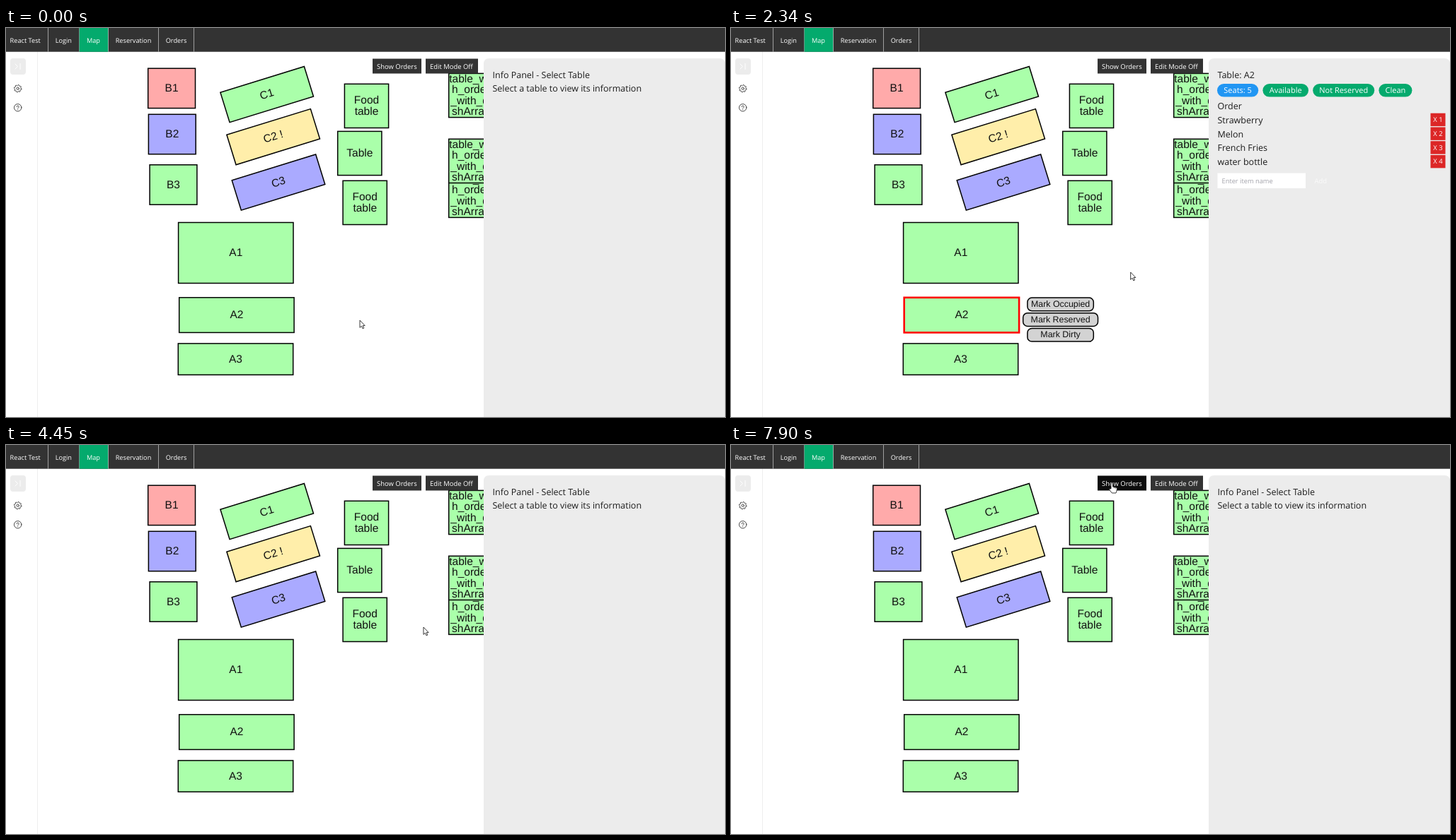
An HTML page that plays this animation: 1016 px wide and 551 px high, repeating every 8000 ms.

```html
<!DOCTYPE html>
<html lang="en">
<head>
<meta charset="utf-8">
<title>Table map</title>
<style>
html, body { margin: 0; width: 100%; height: 100%; overflow: hidden; background: #fff; }
svg { display: block; width: 1016px; height: 551px; font-family: "Open Sans", sans-serif; text-rendering: geometricPrecision; }
.map { font-family: "Liberation Sans", Arial, sans-serif; fill: #111; }
.nav { font-size: 9.2px; fill: #fff; }
.btn { font-size: 9.45px; fill: #fff; }
.pill { font-size: 11px; fill: #fff; }
.info { font-size: 12.5px; fill: #1c1c1c; }
.hint { font-size: 9.3px; fill: #a3a3ab; }
.mid { text-anchor: middle; }
.icon { fill: none; stroke: #444; stroke-linecap: round; stroke-linejoin: round; }
#cursor path { fill: #fff; stroke: #222; stroke-width: .9; stroke-linejoin: round; }
</style>
</head>
<body>
<svg viewBox="0 0 1016 551">
  <path d="M44.5 33V551" stroke="#eee"/>
  <rect x="6" y="43" width="22" height="23" rx="4" fill="#ececec"/>
  <path class="icon" style="stroke:#fff" d="M13 51l3.5 3.5-3.5 3.5M20 50.5v8"/>
  <g class="icon">
    <path id="gear"/>
    <circle cx="16.7" cy="85.7" r="1.7"/>
    <circle cx="16.7" cy="112.8" r="5.2"/>
    <path d="M15.2 111.6a1.5 1.5 0 1 1 2.2 1.3q-.7.4-.7 1M16.7 115.6v.1"/>
  </g>
  <g id="scene"></g>
  <g id="nav"></g>
  <g id="cursor">
    <path id="arrow" d="M0 0V10.4L2.4 8.2 4.1 11.9 5.8 11.1 4.2 7.6H7.2Z"/>
    <path id="hand" d="M-1.3 8V.8A1.25 1.25 0 0 1 1.2 .8V5l4.6 1q1.6.5 1.4 2.2l-.7 3.4-.8 2.4H0l-3.6-4.6q-.5-1.4 1-1.4zM3.2 5.6v1.6M5.2 6v1.5"/>
  </g>
</svg>
<script>
const LOOP = 8000;
const GREEN = '#afa', RED = '#faa', BLUE = '#aaf', YELLOW = '#fea', TEAL = '#04aa6d';
const LABEL = 15.5, SMALL = 12.4, MIDDLE = .295, ROW = 19.75;
const $ = id => document.getElementById(id);

const text = (x, y, s, cls, extra = '') => `<text x="${x}" y="${y}" class="${cls}" ${extra}>${s}</text>`;
const box = (x, y, w, h, fill, extra = '') =>
  `<rect x="${x}" y="${y}" width="${w}" height="${h}" fill="${fill}" ${extra}/>`;

// Tables of one shape share a group; x and y are centres, | breaks a line
const DISH = 'table_wit|h_order|_with_di|shArray';
const groups = [
  { w: 66.8, h: 56.4, tables: [
    { x: 234.1, y: 85.4, label: 'B1', fill: RED },
    { x: 234.8, y: 150.5, label: 'B2', fill: BLUE },
    { x: 236.5, y: 222, label: 'B3' }] },
  { w: 124, h: 44.4, angle: -17.2, tables: [
    { x: 368.7, y: 94.1, label: 'C1', order: 'Apple, Banana, Ice|cream, New item' },
    { x: 377.7, y: 154.2, label: 'C2 !', fill: YELLOW },
    { x: 385, y: 218.6, label: 'C3', order: 'apple', fill: BLUE }] },
  { w: 62.2, h: 62.2, tables: [
    { x: 509.5, y: 110.4, label: 'Food|table' },
    { x: 499.8, y: 177.5, label: 'Table' },
    { x: 507.2, y: 247.4, label: 'Food|table' },
    { x: 656.8, y: 95.5, label: DISH, order: '65542110|08e3f692|3059bcd4' },
    { x: 656.8, y: 237.3, label: DISH, order: '6552ee10|d55243a1|6461b002' },
    { x: 656.8, y: 188.4, label: DISH, order: '6552ee12|011859e0|99792d31' }] },
  { w: 162.4, h: 86, tables: [{ x: 324.8, y: 318.5, label: 'A1' }] },
  { w: 162.4, h: 49.6, tables: [
    { x: 325.9, y: 406.6, label: 'A2', order: 'Strawberry, Melon, French|Fries, water bottle' }] },
  { w: 162.4, h: 44.4, tables: [{ x: 324.5, y: 469.1, label: 'A3' }] },
];
const tables = groups.flatMap(({ tables, ...shape }) =>
  tables.map(t => ({ angle: 0, fill: GREEN, order: '(no order)', ...shape, ...t })));
const guests = {
  A1: { seats: 3, x: 464.6, y: 275.7, items: [] },
  A2: { seats: 5, x: 465.6, y: 382.1, items: ['Strawberry', 'Melon', 'French Fries', 'water bottle'] },
};

function table({ x, y, w, h, fill, label, order, angle }, selected, orders) {
  const frame = selected ? 'stroke="#f00" stroke-width="2.6"' : 'stroke="#000" stroke-width="1.5"';
  const lines = (orders ? order : label).split('|'), size = orders ? SMALL : LABEL;
  const left = orders ? 3.1 - w / 2 : 0, top = orders ? 3.1 - h / 2 : -lines.length * size / 2;
  return `<g transform="translate(${x} ${y}) rotate(${angle})">` + box(-w / 2, -h / 2, w, h, fill, frame) +
    lines.map((s, i) => text(left, top + size * (i + .5 + MIDDLE), s,
      orders ? 'map' : 'map mid', `font-size="${size}"`)).join('') + '</g>';
}

function actions({ x, y }) {
  return ['Mark Occupied', 'Mark Reserved', 'Mark Dirty'].map((s, i) => {
    const w = i === 1 ? 105.8 : 93.4, top = y + 21.7 * i;
    return box(x - w / 2, top, w, 18.6, '#d3d3d3', 'rx="6.2" stroke="#000" stroke-width="1.5"') +
      text(x, top + 12.7, s, 'map mid', `font-size="${SMALL}"`);
  }).join('');
}

function toolbar(orders, hover) {
  const w = orders ? 65.5 : 69, x = 518 + w + 6;
  return box(518, 43.5, w, 21, hover ? '#0d0d0d' : '#333') + box(x, 43.5, 74, 21, '#333') +
    text(524, 57.7, orders ? 'Hide Orders' : 'Show Orders', 'btn') + text(x + 6, 57.7, 'Edit Mode Off', 'btn');
}

function panel(name) {
  const back = '<path d="M675 551V51q0-8 8-8h325q8 0 8 8v500z" fill="#ececec"/>';
  const line = (i, s) => text(687.5, 70.5 + ROW * i, s, 'info');
  if (!name) return back + line(0, 'Info Panel - Select Table') + line(1, 'Select a table to view its information');
  const { seats, items } = guests[name], y = 127 + ROW * items.length;
  let x = 687;
  const pill = (s, w, fill = TEAL) => {
    const left = x;
    x += w + 6.2;
    return box(left, 79, w, 18.6, fill, 'rx="9.3"') + text(left + w / 2, 92.3, s, 'pill mid');
  };
  return back + line(0, `Table: ${name}`) +
    pill(`Seats: ${seats}`, 58.2, '#2196f3') + pill('Available', 64.6) + pill('Not Reserved', 87) + pill('Clean', 47) +
    line(2.26, 'Order') +
    items.map((s, i) => line(3.26 + i, s) + box(988.5, 120.7 + ROW * i, 21, 18.4, '#dc2626') +
      text(999, 133.2 + ROW * i, `X ${i + 1}`, 'btn mid')).join('') +
    box(687.5, y - .5, 124.5, 21.5, '#fff') + text(693.5, y + 13.7, 'Enter item name', 'hint') +
    text(824.5, y + 13.7, 'Add', 'btn', 'opacity=".75"');
}

// Each pointer move bends from the last stop past `bend` to `to`, slowing down
const moves = [
  { start: 120, end: 1060, steps: 8, bend: [310, 232], to: [361.3, 319] },
  { start: 1633, end: 2490, steps: 7, bend: [150, 510], to: [640, 317] },
  { start: 2610, end: 3600, steps: 8, bend: [822, 270], to: [785, 100] },
  { start: 3730, end: 4720, steps: 8, bend: [598, 361], to: [588, 245] },
  { start: 4870, end: 5140, steps: 3, bend: [562, 60], to: [559, 57.7] },
  { start: 5420, end: 6380, steps: 8, bend: [250, -80], to: [91, 400] },
  { start: 6500, end: 7310, steps: 7, bend: [594, 598], to: [538.3, 54] },
];

function pointer(t) {
  let at = [500, 414];
  for (const { start, end, steps, bend, to } of moves) {
    if (t < start) break;
    const step = 1 + Math.floor((t - start) / (end - start) * (steps - 1));
    const rest = (1 - Math.min(1, step / steps)) ** 2, u = 1 - rest;
    at = at.map((a, i) => rest * rest * a + 2 * rest * u * bend[i] + u * u * to[i]);
  }
  return at;
}

let shown = '';
function draw(t) {
  const [x, y] = pointer(t);
  const orders = t >= 5140 && t < 7900;
  const name = t < 1490 || t >= 4150 ? '' : t < 1918 ? 'A1' : 'A2';
  const hover = x > 518 && x < 583 && y > 43 && y < 65;
  const key = [orders, name, hover].join();
  if (key !== shown) {
    $('scene').innerHTML = tables.map(d => table(d, d.label === name, orders)).join('') +
      (name ? actions(guests[name]) : '') + toolbar(orders, hover) + panel(name);
    shown = key;
  }
  $('cursor').setAttribute('transform', `translate(${x} ${y})`);
  $('arrow').style.display = hover ? 'none' : '';
  $('hand').style.display = hover ? '' : 'none';
}

const tabs = { 'React Test': 59.5, Login: 103.7, Map: 144.5, Reservation: 215.5, Orders: 265.5 };
let left = -4.6;
$('nav').innerHTML = box(0, 0, 1016, 33.7, '#333') + Object.entries(tabs).map(([s, right]) => {
  const tab = (s === 'Map' ? box(left, 0, right - left, 33.7, TEAL) : '') +
    text(left + 10.2, 21, s, 'nav') + box(right - .4, 0, .8, 33.7, '#bbb');
  left = right;
  return tab;
}).join('');

$('gear').setAttribute('d', 'M' + Array.from({ length: 32 }, (_, i) => {
  const a = (i + .5) * Math.PI / 16, r = i % 4 < 2 ? 5.3 : 4.2;
  return `${16.7 + r * Math.cos(a)} ${85.7 + r * Math.sin(a)}`;
}).join('L') + 'Z');

const start = performance.now();
function tick() {
  draw((performance.now() - start) % LOOP);
  requestAnimationFrame(tick);
}
tick();
</script>
</body>
</html>
```
